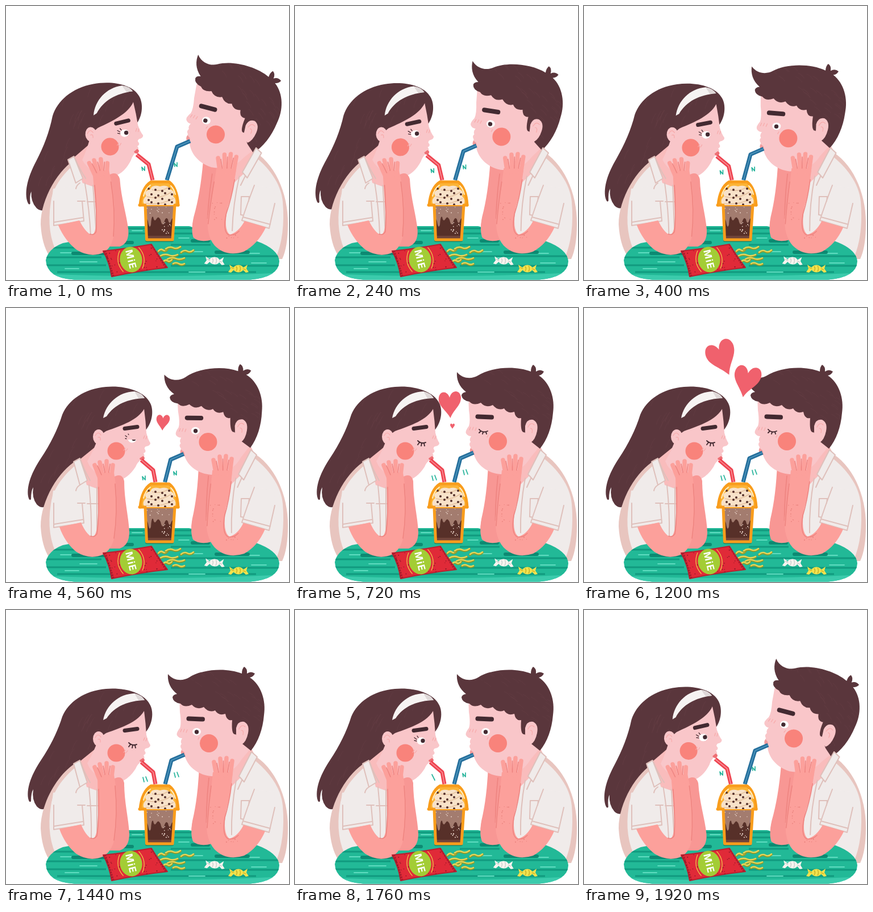
These frames come from a looping animation (498x483 px, 2000 ms). An HTML page:

```html
<!DOCTYPE html>
<html lang="en">
<head>
<meta charset="utf-8">
<title>Sharing a drink</title>
<style>
html, body { margin: 0; width: 100%; height: 100%; overflow: hidden; background: #fff; }
svg { display: block; width: 498px; height: 483px; }
.line { fill: none; stroke: #dfc0bb; stroke-width: 2; stroke-linecap: round; stroke-linejoin: round; }
.ink { fill: none; stroke: #432a31; stroke-linecap: round; stroke-linejoin: round; }
.hair { fill: #5a363c; }
.skin { fill: #f9c6c9; }
.neck { fill: #f9bcbc; }
.arm { fill: #fca09b; }
.far { fill: #f89794; }
.cloth { fill: #f0ebea; }
.edge { fill: #e8c5bf; }
.cheek { fill: #f9837b; }
.blush { fill: none; stroke: #f7a9a9; stroke-width: 1.2; stroke-linecap: round; }
.finger { fill: none; stroke: #fca09b; stroke-width: 7.5; stroke-linecap: round; }
.crease { fill: none; stroke: #ee8480; stroke-width: 1.6; stroke-linecap: round; }
.straw { fill: none; stroke-width: 7; stroke-linejoin: round; }
.shine { fill: none; stroke-width: 1.6; stroke-linejoin: round; }
.mark { fill: none; stroke: #23b39a; stroke-width: 1.7; stroke-linecap: round; stroke-linejoin: round; }
.heart { fill: #f0616d; }
</style>
</head>
<body>
<svg viewBox="0 0 498 483" xmlns="http://www.w3.org/2000/svg">
<defs>
  <path id="girlHair" d="M247 214C258 200 260 180 254 168C244 146 208 136 176 139C138 142 110 162 99 188C91 214 78 240 62 264C46 288 36 312 39 332Q41 341 44 337Q44 322 48 316Q45 334 54 346Q61 354 70 350L132 285L170 250Z"/>
  <path id="boyHair" d="M285 113C296 126 312 125 322 119C345 104 388 101 415 112Q415 104 419 100Q425 103 424 112Q431 107 438 112Q435 118 429 119C449 132 458 160 454 185C452 210 444 232 431 248L416 236L404 219Q396 221 398 194Q388 196 386 183Q374 187 368 177Q357 182 348 171Q336 177 327 167Q314 173 307 165Q294 163 293 154Q294 149 301 148C288 138 284 125 285 113Z"/>
  <path id="tableTop" d="M205 388H322Q329 389 333 395L440 414Q479 428 481 450Q480 478 430 482.500H120Q72 480 70 448Q74 428 100 418L196 400Z"/>
  <path id="cupBody" d="M244 351H297L292.500 412H247.500Z"/>
  <path id="packet" d="M171 432Q210 428 256 420Q268 440 284 461Q238 466 186 477Q182 452 171 432Z"/>
  <clipPath id="girlHairClip"><use href="#girlHair"/></clipPath>
  <clipPath id="boyHairClip"><use href="#boyHair"/></clipPath>
  <clipPath id="tableClip"><use href="#tableTop"/></clipPath>
  <clipPath id="cupClip"><use href="#cupBody"/></clipPath>
  <clipPath id="packetClip"><use href="#packet"/></clipPath>
</defs>

<!-- girl, behind the table -->
<g class="girlHead">
  <use href="#girlHair" class="hair"/>
  <g id="girlStrands" clip-path="url(#girlHairClip)"/>
</g>
<path class="edge" d="M124 269C94 286 61 338 61 385Q63 420 76 440H190L197 325L160 318Z"/>
<path class="cloth" d="M128 272C112 286 84 310 79 345Q70 400 92 440H190L196 330L150 300Z"/>
<g class="girlLean">
  <path class="neck" d="M131 266L163 240L192 300L170 322L142 312Z"/>
  <path class="line" d="M146 312Q151 360 150 404M160 316V400"/>
</g>
<g class="girlHead">
  <path class="skin" d="M163 226L176 217C205 207 232 197 243 178Q246 200 247 220Q250 232 254 238Q254 243 246 244Q242 247 245 250Q247 254 242 256Q246 262 239 266Q231 272 228 280Q215 300 198 304C176 306 152 292 143 270Q155 250 163 226Z"/>
  <ellipse class="skin" cx="163" cy="227" rx="10" ry="13"/>
  <path class="blush" d="M157 225Q162 216 167 224M162 228Q167 226 166 233"/>
  <path d="M171 194C176 168 198 148 226 147Q239 150 244 159C214 160 191 170 177 191Z" fill="#f6f3f2"/>
  <path d="M226 147Q239 150 244 159L233 159Z" fill="#dfd8d8"/>
  <path class="ink" stroke-width="7" d="M209 212.500L231 209.500"/>
  <circle class="cheek" cx="194" cy="252" r="15.500"/>
  <path class="blush" d="M210 247L207 251M214 248L211 252M244 225L242 230M248 226L246 231"/>
  <g id="girlOpen">
    <ellipse cx="222" cy="231" rx="7.500" ry="6.500" fill="#fff"/>
    <circle cx="225" cy="230.500" r="3.700" fill="#432a31"/>
    <path class="ink" stroke-width="1.300" d="M214 228L210 225M214 231L210 230M217 225L215 222"/>
  </g>
  <path id="girlLid" class="skin" d="M212 232Q213 222 222 222Q231 222 232 232Z"/>
  <g id="girlShut" class="ink" stroke-width="1.900">
    <path d="M216 234Q222 240 230 237M219 237L216 241M223 239L222 243M227 239L228 243"/>
  </g>
  <path d="M241 261Q247 264 241 269Q236 269 235 265Z" fill="#ee6f74"/>
</g>

<!-- boy, behind the table -->
<path class="edge" d="M432 254C472 274 497 330 496 384Q496 425 486 446H350L356 310L400 285Z"/>
<path class="cloth" d="M434 262C462 284 484 312 487 345Q492 405 474 446H350L356 320L398 290Z"/>
<g class="boyLean">
  <path class="neck" d="M390 262L430 240L438 257L412 296L392 316L372 290Z"/>
  <path class="line" d="M405 300Q396 350 397 396M417 296L408 316"/>
  <path class="far" d="M340 274L366 280L362 414Q341 418 329 408Q324 396 328 372Q338 330 340 274Z"/>
  <path class="crease" d="M357 296Q351 350 353 408"/>
</g>
<g class="boyHead">
  <path class="skin" d="M305 155L306 180Q309 200 306 208Q299 217 301 221Q304 226 310 226Q306 232 309 236Q305 240 309 245Q307 254 315 259C321 277 338 291 362 293C385 292 404 282 414 264L429 246L414 195L400 155Z"/>
</g>
<g class="boyHair">
  <use href="#boyHair" class="hair"/>
  <g id="boyStrands" clip-path="url(#boyHairClip)"/>
</g>
<g class="boyHead">
  <path class="skin" d="M405 208Q408 195 419 197Q429 202 426 217Q423 232 415 237L405 230Z"/>
  <path class="blush" d="M410 210Q415 200 421 206M414 212Q419 212 417 220"/>
  <path class="ink" stroke-width="8" d="M321.500 191.500L346 192.500"/>
  <circle class="cheek" cx="357" cy="235" r="16"/>
  <path class="blush" d="M309 210L307 215M314 210L312 215M319 211L317 216M340 224L338 228"/>
  <g id="boyOpen">
    <ellipse cx="335.500" cy="214.500" rx="7.500" ry="6.500" fill="#fff"/>
    <circle id="boyPupil" cy="215" r="3.700" fill="#432a31"/>
  </g>
  <path id="boyShut" class="ink" stroke-width="1.900" d="M324 214Q330 221 339 217M327 217L324 220M331 219L330 222M336 218.500L337 222"/>
  <path d="M309 247Q306 252 310 257L316 259L314 251Z" fill="#f19a9b"/>
</g>

<!-- table -->
<use href="#tableTop" fill="#22b997"/>
<g clip-path="url(#tableClip)">
  <path d="M60 472Q270 481 490 470V490H60Z" fill="#3bcbac"/>
  <path d="M200 392H330M216 401H330M60 426H170M290 421H360M60 443H168M290 441H480M60 457H176M290 458H480M90 469H440" fill="none" stroke="#119a7f" stroke-width="3"/>
  <path d="M222 396H240M304 409H322M96 435H120M130 451H160M330 433H346M352 444H372M424 436H446M104 463H128M432 453H458M322 469H350" fill="none" stroke="#5fdcc0" stroke-width="1.800" stroke-linecap="round"/>
  <path d="M248 413H292M186 417H222M328 414H356M118 436H186M370 434H426" stroke="#0d8a72" stroke-width="6" stroke-linecap="round"/>
</g>
<g class="boyLean"><path class="far" d="M328 375L362 375L362 412Q341 418 329 408Q324 396 328 375Z"/></g>
<g class="girlLean"><path class="far" d="M186 300Q204 288 208 305C208 340 216 368 217 395Q217 418 200 424H182Z"/></g>

<!-- cup and straws -->
<path id="redStraw" class="straw" stroke="#ee4450"/><path id="redShine" class="shine" stroke="#fa9098"/>
<path id="blueStraw" class="straw" stroke="#256f9c"/><path id="blueShine" class="shine" stroke="#4f97be"/>
<path d="M236 351Q239 320 255 309H287Q301 320 303 351Z" fill="#fcb437"/>
<path d="M244 351Q238 342 247 335Q241 327 254 323Q257 314 271 318Q285 314 288 323Q299 326 294 335Q302 343 296 352Z" fill="#f8e2c9"/>
<path d="M248 336Q270 342 291 328M246 348Q272 352 295 339M257 324Q272 328 285 320" fill="none" stroke="#e5c3a2" stroke-width="1.700"/>
<g id="chips" fill="#55312c"></g>
<use href="#cupBody" fill="#a37c6f"/>
<g clip-path="url(#cupClip)">
  <path d="M243 366H298V416H243Z" fill="#573029"/>
  <path d="M244 362H297V374Q292 372 290 380Q287 386 285 376Q281 370 278 382Q275 390 272 377Q268 369 265 375Q261 382 259 372Q256 368 255 386Q252 394 250 380Q248 372 244 376Z" fill="#a37c6f"/>
  <path d="M243 405H298V416H243Z" fill="#70443a"/>
  <g id="bubbles" fill="#f2ddd2"></g>
</g>
<g fill="none" stroke="#f99d1c" stroke-linejoin="round" stroke-linecap="round">
  <path stroke-width="5" d="M236 351Q239 320 255 310H287Q301 320 303 351"/>
  <path stroke-width="5" d="M235 351H245L247.500 412H293L297 351H303"/>
  <path stroke-width="2" d="M246 352H296"/>
</g>
<path d="M242 335Q245 322 254 316M290 317Q296 323 298 332" fill="none" stroke="#fff0c8" stroke-width="2" stroke-linecap="round"/>
<path id="redMark" class="mark"/><path id="blueMark" class="mark"/>

<!-- sleeves -->
<path class="cloth" d="M83 322Q78 350 84 387L133 379Q128 340 119 318Z"/>
<path class="line" d="M84 344L84 387L137 379L134 344M85 381L135 373M126 344H139M130 312Q124 316 123 322M143 345H163"/>
<path class="cloth" d="M437 318Q422 350 415 378L465 392Q474 360 472 320Z"/>
<path class="line" d="M437 316Q424 350 415 378L463 392L473 348M417 372L465 385M414 336H428M414 336L413 368L418 369M428 336L427 344"/>

<!-- near arms -->
<g class="girlLean">
  <path class="cloth" d="M119 271L130 265L143 304L130 312Z"/>
  <path class="line" d="M119 271L130 265L143 304L130 312ZM131 267Q138 287 148 304"/>
  <path class="arm" d="M161 290H190Q197 330 195 362C194 400 190 422 172 434Q148 445 124 430Q104 414 94 386L132 378Q141 399 152 404Q162 400 162 360Z"/>
  <path class="finger" d="M156 277L166 302M165 272L171 300M177 270L177 296M188 277L185 302"/>
  <path class="crease" d="M161 278L168 294M171 275L174 290M183 275L181 290M163 316Q164 370 160 398Q155 405 149 402"/>
  <path class="crease" stroke-width="2.500" d="M192 310Q197 360 190 406"/>
</g>
<g class="boyLean">
  <path class="cloth" d="M432 250L442 259L419 303L410 293Z"/>
  <path class="line" d="M432 250L442 259L419 303L410 293Z"/>
  <path class="arm" d="M364 286H399Q396 325 387 355Q381 394 393 403Q408 399 418 379L456 390Q443 420 419 433Q388 443 367 422Q351 404 353 370Q360 330 364 286Z"/>
  <path class="finger" d="M366 268L371 296M377 262L379 292M388 261L386 292M398 266L394 296"/>
  <path class="crease" d="M371 270L374 286M382.500 266V286M393 268L390 286M397 306Q393 340 385 366Q380 396 390 403Q400 406 409 397M361 310Q356 350 354 384"/>
  <g id="freckles" fill="#e77e79"></g>
</g>

<!-- snacks -->
<g id="noodles" fill="none" stroke-linecap="round"></g>
<use href="#packet" fill="#e02a38" stroke="#b91f30" stroke-width="2" stroke-linejoin="round"/>
<g clip-path="url(#packetClip)">
  <path d="M172 432L187 478M258 419L284 461" fill="none" stroke="#a71d2d" stroke-width="8" stroke-dasharray="3 1.500"/>
  <g id="specks" fill="#8f1827"></g>
</g>
<g transform="translate(220 447) rotate(-10)">
  <ellipse rx="19.500" ry="22.500" fill="#a3cd35"/>
  <path d="M-17 -19Q-29 0-17 19M17 -19Q29 0 17 19" fill="none" stroke="#f2c14b" stroke-width="1.300"/>
</g>
<text transform="translate(220 447) rotate(76)" y="6" text-anchor="middle" font-family="Inter, Arial, sans-serif" font-size="17" font-weight="700" letter-spacing="1.500" fill="#fff">MiE</text>
<g id="candies"></g>

<path id="heartA" class="heart"/><path id="heartB" class="heart"/>
</svg>
<script>
const STEP = 80, STEPS = 25;
const $ = id => document.getElementById(id);
const all = name => [...document.getElementsByClassName(name)];
const mix = (a, b, k) => a + (b - a) * k;
const NS = 'http://www.w3.org/2000/svg';

function add(parent, tag, attrs) {
  const el = document.createElementNS(NS, tag);
  for (const k in attrs) el.setAttribute(k, attrs[k]);
  return parent.appendChild(el);
}
function seeded(seed) {
  return () => (seed = (seed * 16807) % 2147483647) / 2147483647;
}
function dots(id, count, [x, y, w, h], size, seed) {
  const rnd = seeded(seed);
  for (let i = 0; i < count; i++) {
    add($(id), 'circle', { cx: x + rnd() * w, cy: y + rnd() * h, r: size * (0.7 + rnd() * 0.5) });
  }
}
function strands(id, count, [x, y, w, h], dx, dy, seed) {
  const rnd = seeded(seed);
  let d = '';
  for (let i = 0; i < count; i++) {
    d += `M${x + rnd() * w} ${y + rnd() * h}q${dx * 0.6} ${dy * 0.3} ${dx} ${dy}`;
  }
  add($(id), 'path', { d, fill: 'none', stroke: '#754a50', 'stroke-width': 1, opacity: 0.25 });
}
function candy(x, y, angle, fill, shade) {
  const g = add($('candies'), 'g', { transform: `translate(${x} ${y}) rotate(${angle})` });
  add(g, 'path', { d: 'M-6 0L-16-7L-14 0L-18 6L-13 7ZM6 0L16-7L14 0L18 6L13 7Z', fill });
  add(g, 'ellipse', { rx: 9, ry: 6.5, fill });
  add(g, 'path', { d: 'M-4-4Q-1 0-4 4M2-5Q5 0 2 5M-8 0L-13-2M8 0L13 2', fill: 'none', stroke: shade, 'stroke-width': 1.3 });
}
function noodle(x, y, length, rise) {
  const q = length / 4;
  const d = `M${x} ${y}q${q} ${rise - 3} ${2 * q} ${rise}t${2 * q} ${rise}`;
  add($('noodles'), 'path', { d, stroke: '#8f9a2c', 'stroke-width': 4, transform: 'translate(0 1)' });
  add($('noodles'), 'path', { d, stroke: '#e6d65a', 'stroke-width': 2.4 });
}

strands('girlStrands', 70, [50, 140, 200, 190], -9, 17, 11);
strands('boyStrands', 45, [300, 105, 145, 120], 12, 9, 23);
dots('bubbles', 14, [275, 380, 16, 22], 0.9, 5);
dots('bubbles', 10, [248, 354, 44, 14], 0.8, 9);
dots('freckles', 12, [360, 345, 18, 35], 0.8, 31);
dots('freckles', 8, [388, 402, 20, 8], 0.8, 37);
dots('specks', 38, [178, 424, 96, 50], 1, 41);
for (let i = 0; i < 16; i++) {
  const row = Math.floor(i / 4);
  add($('chips'), 'circle', { cx: 251 + (i % 4) * 12 + (row % 2) * 5, cy: 322 + row * 8 + (i % 3) * 2, r: 2 });
}
noodle(268, 432, 16, -2);
noodle(281, 428, 26, -2);
noodle(272, 440, 30, -1);
noodle(284, 446, 30, -1);
noodle(308, 434, 22, -2);
noodle(294, 454, 20, 0);
noodle(276, 451, 16, -2);
candy(367, 449, 3, '#f7f4ef', '#c6cdca');
candy(409, 463, 0, '#f2e24d', '#c5ac24');

// Rows: step, then values, joined by straight lines.
const boyTilt = [[0, 1], [1, 0.93], [2, 0.77], [3, 0.53], [4, 0.33], [5, 0.2], [6, -0.05], [7, -0.13], [9, 0], [22, 0], [23, 0.6], [24, 1]];
const girlTilt = [[0, 1], [1, 0.95], [3, 0.78], [5, 0.55], [6, 0.2], [7, 0], [22, 0], [23, 0.5], [24, 0.9]];
// Hearts: step, x, y, scale, turn, opacity.
const hearts = {
  heartA: [[6, 276, 208, 0.2, 2, 1], [7, 276, 201, 0.6, 3, 1], [8, 277, 190, 0.85, 2, 1], [10, 268, 148, 1.15, -7, 1],
    [12, 249, 98, 1.33, -20, 1], [14, 244, 88, 1.35, -22, 1], [15, 243, 87, 1.33, -22, 1], [17, 242, 86, 1, -22, 0]],
  heartB: [[9, 277, 208, 0.2, 0, 1], [10, 277, 199, 0.55, 2, 1], [12, 280, 177, 1, 5, 1],
    [15, 286, 128, 1.2, 12, 1], [17, 288, 110, 0.9, 14, 0]]
};
for (const id in hearts) {
  $(id).setAttribute('d', 'M0 25C-7 11-22 2-19-12C-16-25-3-23 0-11C4-25 19-25 20-11C20 4 6 10 0 25Z');
}

function sample(rows, n) {
  let i = 0;
  while (i < rows.length - 2 && rows[i + 1][0] <= n) i++;
  const a = rows[i], b = rows[i + 1];
  const k = Math.min(1, Math.max(0, (n - a[0]) / (b[0] - a[0])));
  return a.slice(1).map((v, j) => mix(v, b[j + 1], k));
}
const setAll = (name, value) => all(name).forEach(el => el.setAttribute('transform', value));
const show = (id, on) => $(id).style.display = on ? '' : 'none';
const lean = k => `matrix(1 0 ${k} 1 ${-k * 420} 0)`;

function setStraw(name, points) {
  const d = 'M' + points.map(p => p.join(' ')).join('L');
  $(name + 'Straw').setAttribute('d', d);
  $(name + 'Shine').setAttribute('d', d);
}

function draw(n) {
  const [b] = sample(boyTilt, n), [g] = sample(girlTilt, n);

  setAll('girlHead', `translate(${-11 * g} ${-4 * g}) rotate(${-6 * g} 194 252)`);
  setAll('girlLean', lean(0.067 * g));
  setAll('boyHead', `translate(${12 * b} ${-8.5 * b}) rotate(${12.5 * b} 357 235)`);
  setAll('boyHair', `translate(${12 * b} ${-11 * b}) rotate(${18 * b} 357 235)`);
  setAll('boyLean', lean(-0.047 * b));

  const girlShut = n >= 9 && n < 21, boyShut = n >= 9 && n < 16;
  show('girlShut', girlShut);
  show('girlOpen', !girlShut);
  show('girlLid', n === 7 || n === 8 || n === 21);
  show('boyShut', boyShut);
  show('boyOpen', !boyShut);
  $('boyPupil').setAttribute('cx', mix(335.5, 334, b));

  setStraw('red', [[mix(238, 230, g), mix(268, 262, g)], [mix(259, 251, g), mix(286, 279, g)], [mix(263, 258, g), 307]]);
  setStraw('blue', [[mix(314, 324, b), mix(255, 238, b)], [mix(291, 301, b), mix(265, 248, b)], [mix(280, 283, b), 307]]);

  const slashes = n > 7 && n < 22;
  const wob = n % 2;
  const shape = slashes ? 'm-3-4l2 8m3-9l3 8' : 'm-3 3l-1-6l5 6l0-7';
  $('redMark').setAttribute('d', n === 22 ? 'M241 290l5 10' : `M${244 - g} ${mix(299, 287, g) + wob}${shape}`);
  $('blueMark').setAttribute('d', `M${299 + b} ${mix(291, 280, b) - wob}${shape}`);

  for (const id in hearts) {
    const rows = hearts[id];
    const on = n >= rows[0][0] && n < rows[rows.length - 1][0];
    show(id, on);
    if (!on) continue;
    const [x, y, s, r, o] = sample(rows, n);
    $(id).setAttribute('transform', `translate(${x} ${y}) rotate(${r}) scale(${s})`);
    $(id).setAttribute('opacity', o);
  }
}

const start = performance.now();
let last = -1;
function tick() {
  const n = Math.floor((performance.now() - start) / STEP) % STEPS;
  if (n !== last) draw(last = n);
  requestAnimationFrame(tick);
}
tick();
</script>
</body>
</html>
```
